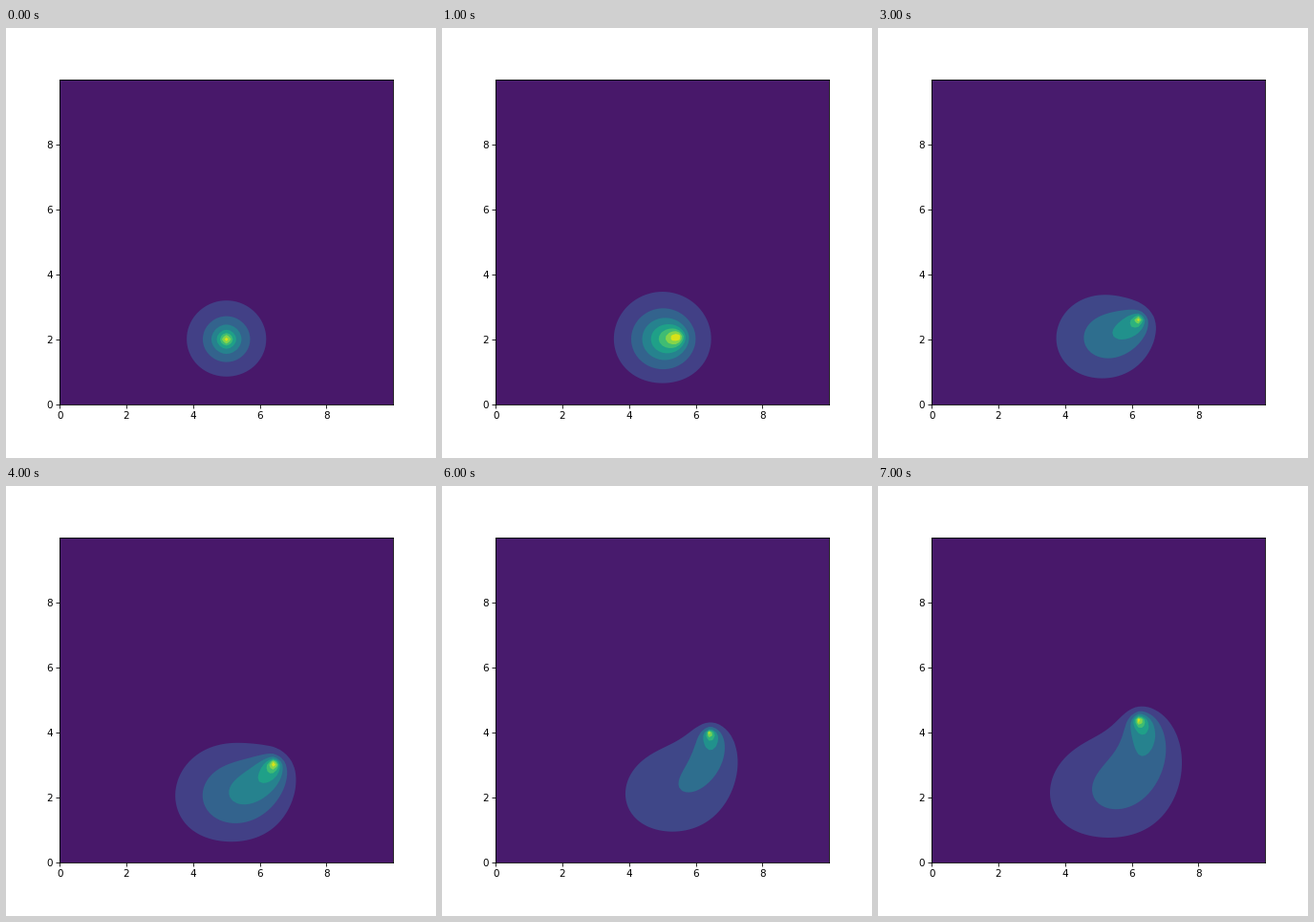
A matplotlib script that plays this animation: 450 by 450 pixels, repeating every 8 s.

```python
import numpy as np
import matplotlib.pyplot as plt
from matplotlib.animation import FuncAnimation

FRAMES = 8
SUBSTEPS = 55          # diffusion steps per frame
WARMUP = 550           # steps with the emitter at rest
N = 101                # grid nodes per side
H = 0.1
KAPPA = 0.2            # D * dt / h^2
RATE = 5.91            # amount released per step

# Contour spacing and number of bands for each frame
BANDS = [(2, 8), (1.5, 8), (2, 7), (2, 7), (1.5, 8), (2, 8), (2, 7), (1.5, 8)]


def emitter(t):
    """Emitter position on its circle, 18 degrees per frame."""
    a = np.pi / 10 * max(t, 0)
    return 5 + 1.5 * np.sin(a), 3.5 - 1.5 * np.cos(a)


def release(u, x, y):
    """Share one release among the four nearest nodes."""
    gx, gy = x / H + 1e-9, y / H + 1e-9
    i, j = int(gx), int(gy)
    fx, fy = gx - i, gy - j
    u[j:j + 2, i:i + 2] += RATE * np.outer([1 - fy, fy], [1 - fx, fx])


def diffuse(u):
    """Explicit heat step with the walls held at zero."""
    mid = u[1:-1, 1:-1]
    lap = u[2:, 1:-1] + u[:-2, 1:-1] + u[1:-1, 2:] + u[1:-1, :-2] - 4 * mid
    u[1:-1, 1:-1] = mid + KAPPA * lap


def simulate():
    u = np.zeros((N, N))
    fields = []
    for k in range(-WARMUP, (FRAMES - 1) * SUBSTEPS + 1):
        t = k / SUBSTEPS
        diffuse(u)
        release(u, *emitter(t))
        if k >= 0 and k % SUBSTEPS == 0:
            step, bands = BANDS[k // SUBSTEPS]
            peak = (bands - 0.4) * step
            shown = np.minimum(u, peak - 0.3 * step)
            x, y = emitter(t)
            shown[round(y / H), round(x / H)] = peak
            fields.append(shown)
    return fields


fields = simulate()
axis = np.arange(N) * H
cmap = plt.get_cmap("viridis")

fig = plt.figure(figsize=(6, 6), dpi=75, facecolor="white")
ax = fig.add_axes([0.125, 0.125, 0.775, 0.755])
ax.set_xticks(range(0, 10, 2))
ax.set_yticks(range(0, 10, 2))


def draw(frame):
    for old in list(ax.collections):
        old.remove()
    step, bands = BANDS[frame]
    ax.set_facecolor(cmap(0.5 / bands))
    for b in range(1, bands):
        ax.contourf(axis, axis, fields[frame], [b * step, 1000],
                    colors=[cmap((b + 0.5) / bands)], antialiased=True)
    ax.set_xlim(0, 9.995)
    ax.set_ylim(0, 9.995)
    return ax.collections


anim = FuncAnimation(fig, draw, frames=FRAMES, interval=1000,
                     init_func=lambda: [], repeat=True, repeat_delay=0)
plt.show()
```
